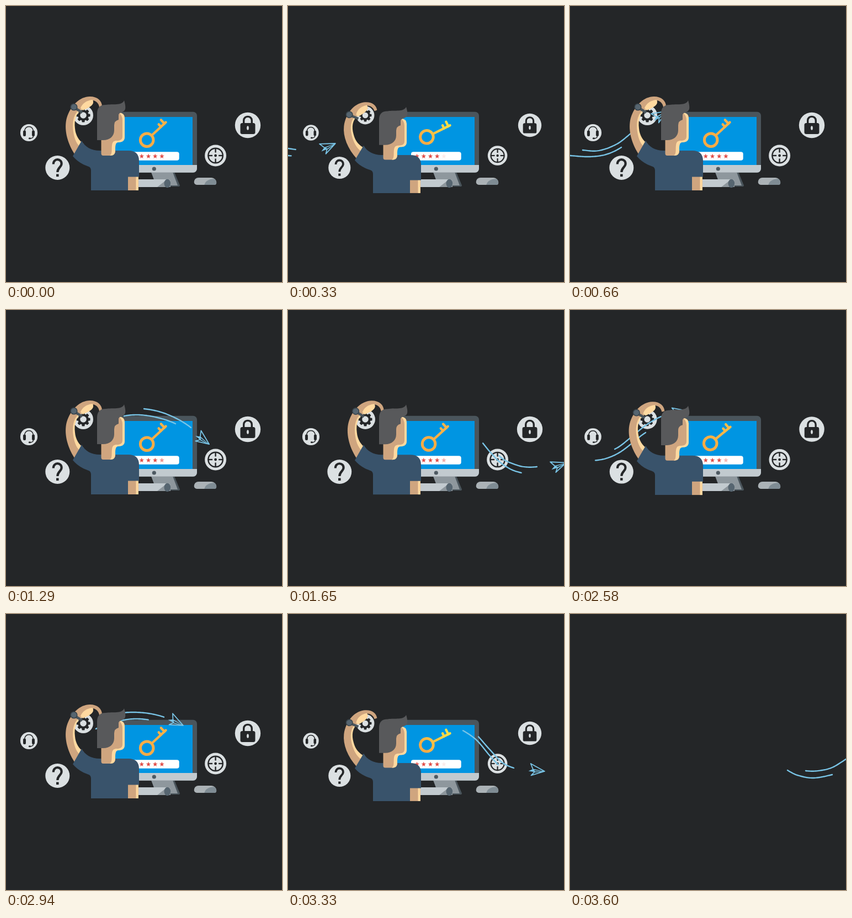
An HTML page with a canvas for the animation above (3.63 s loop, 500x500 px).

```html
<!DOCTYPE html>
<html lang="en">
<head>
<meta charset="utf-8">
<title>Forgotten password</title>
<style>
html, body { margin: 0; width: 100%; height: 100%; overflow: hidden; background: #242628; }
canvas { display: block; width: 500px; height: 500px; }
</style>
</head>
<body>
<canvas id="stage" width="500" height="500"></canvas>
<script>
const ctx = document.getElementById('stage').getContext('2d');
const STEP = 30, LOOP = 3630, PASS = 1800, BOB = 600;
const INK = '#242628', BUBBLE = '#dbe0e2', SKY = '#79c4e6';
const SKIN = '#cfa57f', GLOW = '#ffd9a0', SHIRT = '#39536b', HAIR = '#58595b', STEEL = '#4a555c';

const clamp01 = v => Math.min(1, Math.max(0, v));
const smooth = (a, b, v) => { const u = clamp01((v - a) / (b - a)); return u * u * (3 - 2 * u); };

// Smooth function through [x, y] points, linear beyond the ends.
function curve(pts) {
  const n = pts.length;
  const rise = (i, j) => (pts[j][1] - pts[i][1]) / (pts[j][0] - pts[i][0]);
  const slope = pts.map((_, i) => rise(Math.max(0, i - 1), Math.min(n - 1, i + 1)));
  return x => {
    if (x <= pts[0][0]) return pts[0][1] + slope[0] * (x - pts[0][0]);
    if (x >= pts[n - 1][0]) return pts[n - 1][1] + slope[n - 1] * (x - pts[n - 1][0]);
    let i = 0;
    while (x > pts[i + 1][0]) i++;
    const w = pts[i + 1][0] - pts[i][0], u = (x - pts[i][0]) / w, v = 1 - u;
    return pts[i][1] * (1 + 2 * u) * v * v + pts[i + 1][1] * u * u * (3 - 2 * u)
      + w * u * v * (slope[i] * v - slope[i + 1] * u);
  };
}

const TIMES = [270, 660, 780, 1290, 1530, 1800, 2070];
const track = xs => curve(xs.map((x, i) => [TIMES[i], x]));
const trails = [
  {
    y: curve([[-20, 255], [23, 261], [52, 262], [85, 250], [110, 231], [137, 209], [165, 193], [205, 180],
      [250, 179], [292, 189], [335, 213], [365, 245], [388, 269], [409, 279], [427, 284], [450, 284],
      [475, 278], [500, 263]]),
    tail: track([-90, 23, 81, 250, 345, 427, 520]),
    head: track([-5, 118, 165, 335, 409, 505, 600])
  },
  {
    y: curve([[0, 271], [35, 273], [65, 269], [93, 256], [137, 222], [175, 203], [214, 192], [242, 190],
      [275, 195], [307, 206], [340, 227], [365, 256], [381, 273], [394, 283], [412, 292], [440, 297],
      [475, 291], [485, 286], [500, 275]]),
    tail: track([-110, -5, 46, 214, 317, 394, 484]),
    head: track([-10, 93, 137, 307, 381, 475, 560])
  }
];
const planeX = curve([[0, -22], [270, 57], [660, 164], [780, 200], [1290, 358], [1530, 452], [1620, 481], [1800, 545]]);
const planeY = curve([[-22, 266], [25, 264], [57, 260], [110, 236], [164, 197], [200, 185], [260, 182],
  [310, 196], [358, 235], [400, 267], [452, 283], [490, 281], [545, 255]]);
const starFade = curve([[0, 1], [.2, 1], [.3, .62], [.6, .42], [.9, .12], [1, .1]]);

function shape(d, fill) { ctx.fillStyle = fill; ctx.fill(new Path2D(d)); }
function line(d, color, width, cap = 'butt') {
  ctx.strokeStyle = color; ctx.lineWidth = width; ctx.lineCap = cap; ctx.lineJoin = 'round';
  ctx.stroke(new Path2D(d));
}
function box(x, y, w, h, r, fill) {
  ctx.beginPath(); ctx.roundRect(x, y, w, h, r); ctx.fillStyle = fill; ctx.fill();
}
function oval(x, y, rx, ry, fill) {
  ctx.beginPath(); ctx.ellipse(x, y, rx, ry, 0, 0, 7); ctx.fillStyle = fill; ctx.fill();
}
function ring(x, y, r, width, color) {
  ctx.beginPath(); ctx.arc(x, y, r, 0, 7); ctx.lineWidth = width; ctx.strokeStyle = color; ctx.stroke();
}
function placed(x, y, angle, scale, draw) {
  ctx.save(); ctx.translate(x, y); ctx.rotate(angle); ctx.scale(scale, scale); draw(); ctx.restore();
}
function turned(count, draw) {
  for (let i = 0; i < count; i++) placed(0, 0, i * 2 * Math.PI / count, 1, draw);
}

const bubbles = [
  [41.5, 229.5, 15.6, () => {
    line('M-8,-2C-8,-14 8,-14 8,-2', INK, 1.6);
    box(-10.5, -4, 5, 10.5, 2, INK);
    box(5.5, -4, 5, 10.5, 2, INK);
    line('M8,6Q8,10 2,10.5', INK, 1.4);
    oval(1.5, 10.3, 2.2, 1.5, INK);
  }],
  [93.3, 293, 22, () => {
    line('M-7.5,-6.5C-7.5,-18 7.8,-17 7.3,-7C7,-1 0,0 0,8', INK, 4.2);
    box(-2.3, 11.5, 4.6, 4.6, 0, INK);
  }],
  [140, 198, 18, () => {
    turned(8, () => box(-2.6, -12.5, 5.2, 5, 1, INK));
    oval(0, 0, 9.8, 9.8, INK);
    oval(0, 0, 5.8, 5.8, BUBBLE);
  }],
  [379.6, 271, 19.5, () => {
    ring(0, 0, 13.2, 2.4, INK);
    turned(4, () => box(-1.2, -14, 2.4, 8.5, 0, INK));
    oval(0, 0, 2.4, 2.4, INK);
  }],
  [438, 216, 23.2, () => {
    box(-13.5, -4, 27, 20, 3.5, INK);
    line('M-7.3,-3V-8.5C-7.3,-18 7.3,-18 7.3,-8.5V-3', INK, 3.4);
    oval(0, 5, 1.9, 3.8, BUBBLE);
  }]
];

function star(x, y, r) {
  ctx.beginPath();
  for (let i = 0; i < 10; i++) {
    const a = i * Math.PI / 5 - Math.PI / 2, q = i % 2 ? r * .42 : r;
    ctx.lineTo(x + q * Math.cos(a), y + q * Math.sin(a));
  }
  ctx.fillStyle = '#e04f4a'; ctx.fill();
}

function key(k) {
  placed(272, 227, (-43 + 17 * k) * Math.PI / 180, 1, () => {
    const paint = ctx.createLinearGradient(-30, 8, 22, -6);
    paint.addColorStop(0, '#f9ab45');
    paint.addColorStop(1, `hsl(${36 + 16 * k} 94% 63%)`);
    ring(-23, 0, 11.8, 5, paint);
    line('M-11,0H24', paint, 4.4, 'round');
    line('M12,0V-6M20.5,0V-9', paint, 4.4, 'round');
  });
}

function desk(k, p) {
  shape('M263,301H305L315,325Q315,327 313,327H273Z', STEEL);
  shape('M263,301H302L311,325H272Z', '#8e979d');
  box(188, 191.7, 158, 110, 7, STEEL);
  box(196, 201, 142, 87, 0, '#0095e2');
  box(188, 288, 158, 13.7, [0, 0, 7, 7], '#c2cacf');
  oval(268.3, 295, 3.6, 3.6, '#4e5a62');
  box(223, 264.2, 90.7, 15.6, 4, '#fff');
  for (let i = 0; i < 5; i++) {
    ctx.globalAlpha = i === 4 ? clamp01(starFade(p)) : 1;
    star(233.6 + 12.2 * i, 272.2, 4.6);
  }
  ctx.globalAlpha = 1;
  key(k);
  box(230, 314, 68, 14, [0, 4, 4, 0], '#c2cacf');
  shape('M274,328L292,314H294Q298,314 298,318V328Z', '#8e979d');
  oval(292.3, 321.5, 5.8, 7.8, '#566570');
  ctx.save();
  ctx.beginPath(); ctx.roundRect(340.7, 311, 40.5, 13, [8, 9, 4, 5]); ctx.clip();
  box(340, 310, 42, 15, 0, '#abb2b6');
  shape('M359,325C361,316 368,313 382,313V325Z', '#7f8c94');
  ctx.restore();
}

function raisedArm() {
  shape('M124,268C110,246 105,222 110,203C117,180 134,164 152,164C166,164 174,172 174,182L169,183'
    + 'C168,175 161,171 157,171C161,178 152,184 140,186C126,192 122,206 124,222C126,235 132,245 140,250Z', SKIN);
  shape('M131,189C121,199 120,214 122,228C124,242 129,251 135,256L141,250C132,244 126,234 125,222'
    + 'C123,206 127,194 138,187Z', GLOW);
  shape('M135,185C138,177 145,171 157,170C161,178 152,184 139,189Z', GLOW);
  line('M122,183L138,193', STEEL, 4.6);
  oval(123, 183, 6.6, 6.6, '#39444b');
  oval(123, 183, 5, 5, '#566570');
}

function man(k) {
  ctx.save();
  ctx.transform(1, 0, 0, 1 - .043 * k, 0, 19.4 * k);
  placed(135, 262, -9 * k * Math.PI / 180, 1, () => { ctx.translate(-135, -262); raisedArm(); });
  box(221, 306, 19, 28, 0, SKIN);
  box(235.5, 306, 4.2, 28, 0, GLOW);
  shape('M121,272L137,244C143,255 154,262 170,262H222C234,262 241,268 241,280V309.5H221V334H154V298'
    + 'C154,290 148,291 140,287C132,283 126,278 121,272Z', SHIRT);
  shape('M172.5,235H200V247C198,250 198,255 198,262C198,268 195,271 190,271H176Q172.5,271 172.5,267Z', SKIN);
  shape('M205,193Q215,194 215,203V238C215,246 208,247 203,247C198,248 198,253 198,261C198,268 195,271 188,271'
    + 'C193,268 191,260 192,252C193,244 198,243 204,243Z', GLOW);
  shape('M190,194H205Q211,198 211,207V236C211,244 204,244 199,244L188,247Z', SKIN);
  shape('M165,243V196C165,185 169,179 181,179C193,177 210,181 214,171C216,178 218,187 214,190'
    + 'C210,193 205,193 204,197V206Q196,208 196,216V225C196,236 188,243 176,243Z', HAIR);
  ctx.restore();
}

function trail({ y, tail, head }, time) {
  const from = Math.max(-5, tail(time)), to = Math.min(505, head(time));
  if (to <= from) return;
  ctx.beginPath();
  for (let x = from; x < to; x += 2) ctx.lineTo(x, y(x));
  ctx.lineTo(to, y(to));
  ctx.strokeStyle = SKY; ctx.lineWidth = 2.4; ctx.lineCap = 'round'; ctx.lineJoin = 'round';
  ctx.stroke();
}

function flight(time) {
  if (time < 0 || time > 2250) return;
  trails.forEach(t => trail(t, time));
  const x = planeX(time), y = planeY(x);
  if (x > 530) return;
  const angle = Math.atan2(planeY(x + 4) - planeY(x - 4), 8);
  placed(x, y, angle, 1, () => {
    line('M13,0L-14,-10L-8,0M13,0L-10,11L-5,4M13,0L-5,4', SKY, 1.8, 'round');
    shape('M13,0L-8,-1L-16,4L-5,4Z', SKY);
    shape('M10,0.5L-6,1L-4,3Z', INK);
  });
}

function render(time) {
  ctx.fillStyle = INK;
  ctx.fillRect(0, 0, 500, 500);
  const visible = time < LOOP - STEP;
  const p = 1 - Math.abs(2 * (time % BOB) / BOB - 1);
  const k = smooth(.45, .95, p);
  if (visible) {
    desk(k, p);
    for (const [x, y, r, icon] of bubbles) {
      placed(x, y, 0, 1 - .09 * k, () => { oval(0, 0, r, r, BUBBLE); icon(); });
    }
  }
  flight(time);
  if (time < LOOP - STEP) flight(time - PASS);
  if (visible) man(k);
  else flight(time - PASS);
}

let start;
function tick(now) {
  if (start === undefined) start = now;
  render(Math.floor((now - start) % LOOP / STEP) * STEP);
  requestAnimationFrame(tick);
}
render(0);
requestAnimationFrame(tick);
</script>
</body>
</html>
```
